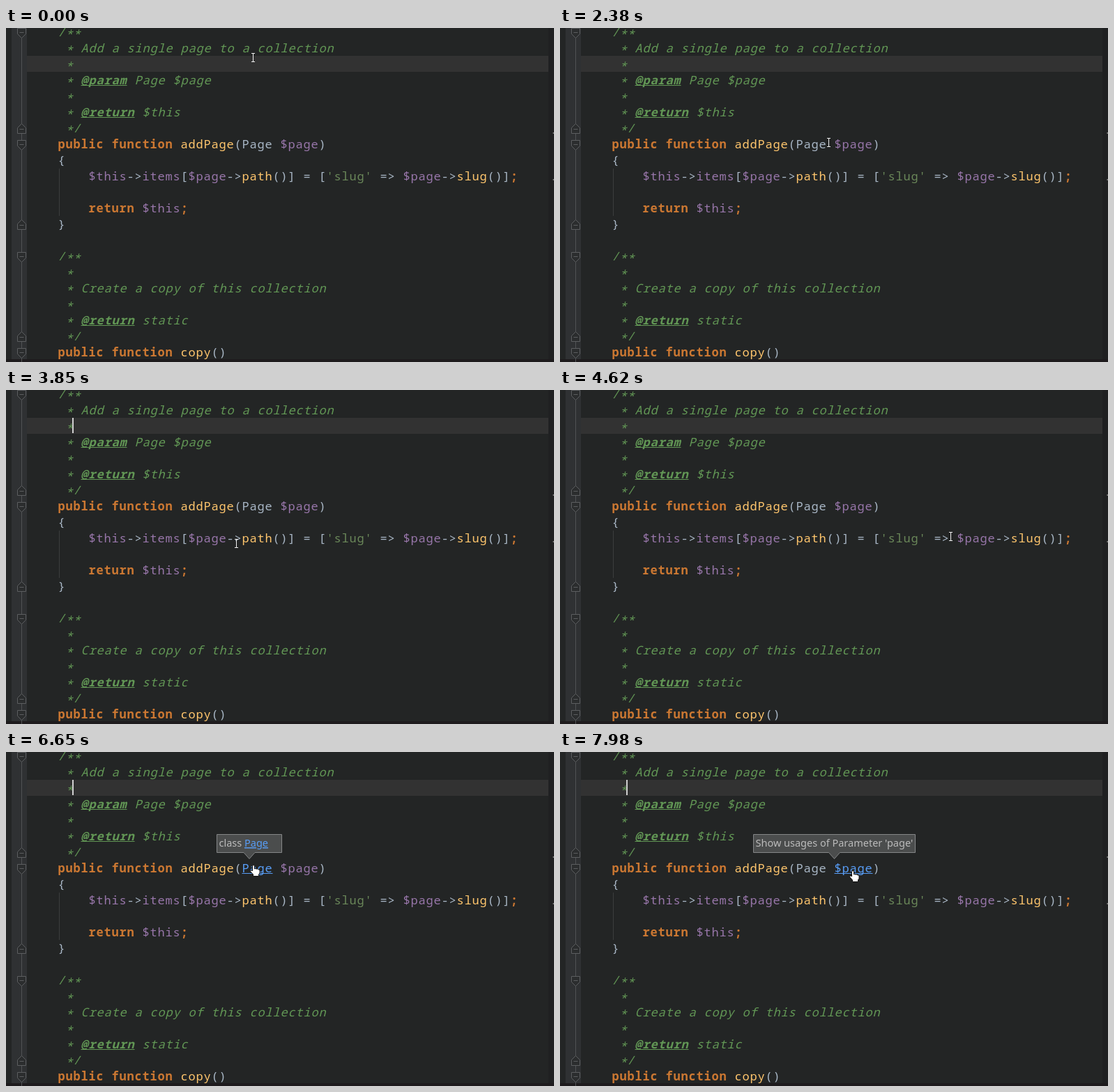
Write an HTML page that moves like this. It is 786x480 px and loops after 8 s.

```html
<!DOCTYPE html>
<html lang="en">
<head>
<meta charset="utf-8">
<title>Code editor</title>
<style>
html, body { margin: 0; width: 100%; height: 100%; overflow: hidden; background: #232525; }
pre, svg { position: absolute; left: 0; top: 0; margin: 0; }
pre {
  left: 30.5px; top: -6px; color: #a9b7c6;
  font: 17px/23px "Noto Sans Mono", "DejaVu Sans Mono", monospace;
  letter-spacing: .8px; font-variant-ligatures: none;
}
pre b { color: #cc7832; }
pre i { color: #629755; }
pre u { font-weight: bold; }
pre u, .link { text-decoration: underline 1px; text-underline-offset: 1px; text-decoration-skip-ink: none; }
pre em { color: #ffc66d; font-style: normal; }
pre var { color: #9876aa; font-style: normal; }
pre q { color: #6a8759; quotes: none; }
pre sub { position: relative; top: 3px; font-size: inherit; vertical-align: baseline; line-height: 0; }
pre .link, pre .link var { color: #589df6; }
.tip { font: 14.5px "Noto Sans", "Open Sans", sans-serif; fill: #bbb; }
.tip path { fill: #4b4d4d; stroke: #858788; stroke-linejoin: round; }
.tip .link { fill: #589df6; }
.fold { fill: #2b2d2e; stroke: #5c5e60; }
</style>
</head>
<body>
<svg id="back" width="786" height="480">
  <rect x="8" width="22" height="480" fill="#2f3133"/>
  <rect x="778" width="8" height="480" fill="#1f2021"/>
  <rect x="30" y="40" width="748" height="23" fill="#323232"/>
  <rect y="476" width="786" height="4" fill="#1e1b1d"/>
  <path d="M784.5 151h2M784.5 218h2" stroke="#808080" stroke-width="2"/>
  <path d="M76.5 202V270" stroke="#3b3d3d"/>
  <path d="M22.5 0V480" stroke="#505254"/>
</svg>
<pre>
    <i>/**</i>
    <i> * Add a single page to a collection</i>
    <i> *</i>
    <i> * <u>@param</u> Page $page</i>
    <i> *</i>
    <i> * <u>@return</u> $this</i>
    <i> */</i>
    <b>public function</b> <em>addPage</em>(<span id="type">Page</span> <span id="param"><var>$page</var></span>)
    {
        <var>$this</var>-&gt;<var>items</var>[<var>$page</var>-&gt;<em>path</em>()] = [<q>'slug'</q> =&gt; <var>$page</var>-&gt;<em>slug</em>()]<b>;</b>

        <b>return</b> <var>$this</var><b>;</b>
    }

    <i>/**</i>
    <i> *</i>
    <i> * Create a copy of this collection</i>
    <i> *</i>
    <i> * <u>@return</u> static</i>
    <i> */</i>
    <b>public function</b> <em>copy</em>()
</pre>
<svg id="front" width="786" height="480">
  <rect id="caret" x="95" y="40" width="2" height="22" fill="#d0d0d0"/>
  <path id="beam" d="M-2 -5.5H3M.5 -5.5V6.5M-2 6.5H3" stroke="#f0f0f0"/>
  <path id="hand" fill="#fff" stroke="#111" d="M-1.5 .5Q0 -1.5 1.5 .5V5Q3 3.7 4 5.2Q5.5 4.2 6.5 5.8Q8.5 5 9 7.5V11L7.5 13V15.5H-.5V13L-4.5 8.5Q-4.5 6.5 -2.5 7L-1.5 8Z"/>
</svg>
<script>
const LOOP = 8000, STEP = 70, BLINK = 493.5, BLINK_START = 728, HOVER_START = 6440;
const ROW = 23, COL = 11, TEXT_LEFT = 30;
const $ = id => document.getElementById(id);

// where the pointer turns or rests: time, x, y
const stops = [
  [280, 354, 42], [1190, 270, 129], [2380, 385, 164], [2800, 394, 190], [3850, 330, 220],
  [4900, 644, 206], [5460, 535, 188], [6440, 354, 162], [7140, 357, 165], [7770, 420, 171]
];

function pointerAt(t) {
  const i = stops.findIndex(s => s[0] > t);
  const b = stops.at(i), a = i > 0 ? stops[i - 1] : b;
  const k = a === b ? 0 : (t - a[0]) / (b[0] - a[0]);
  return [1, 2].map(n => Math.round(a[n] + (b[n] - a[n]) * k));
}

// column ranges of the words that turn into links
const words = { type: [28, 32], param: [33, 38] };

const show = (id, on) => $(id).style.display = on ? '' : 'none';

function draw(now) {
  const t = Math.floor(now % LOOP / STEP) * STEP;
  const [x, y] = pointerAt(t);
  const col = (x - TEXT_LEFT) / COL;
  let linked = false;
  for (const [id, [from, to]] of Object.entries(words)) {
    const on = t >= HOVER_START && col >= from && col < to;
    $(id).classList.toggle('link', on);
    show(id + 'Tip', on);
    linked ||= on;
  }
  show('hand', linked);
  show('beam', !linked);
  $(linked ? 'hand' : 'beam').setAttribute('transform', `translate(${x} ${y})`);
  show('caret', t >= BLINK_START && Math.floor((t - BLINK_START) / BLINK) % 2 === 0);
  requestAnimationFrame(draw);
}

function addTip(id, center, width, label) {
  const half = width / 2;
  $('caret').insertAdjacentHTML('afterend', `<g id="${id}" class="tip" transform="translate(${center} 118.5)">
    <path d="M${-half} 0H${half}V26H8L0 35L-8 26H${-half}Z"/>
    <text x="${3 - half}" y="17.5">${label}</text></g>`);
}

addTip('typeTip', 349, 93, 'class <tspan class="link">Page</tspan>');
addTip('paramTip', 393.5, 232, "Show usages of Parameter 'page'");

// fold markers on the first and last row of each block
document.querySelector('pre').textContent.split('\n').forEach((line, i) => {
  const opens = /^ *(\/\*\*|public)/.test(line);
  if (!opens && !/^ *(\*\/|})/.test(line)) return;
  const y = ROW * i + (opens ? 7.5 : 6.5);
  $('back').insertAdjacentHTML('beforeend',
    `<path class="fold" transform="translate(22.5 ${y}) scale(1 ${opens ? 1 : -1})"
      d="M-6 -7H6V1L0 7L-6 1ZM-3 -1H3"/>`);
});

// asterisks sit at mid-height
for (const el of document.querySelectorAll('pre i'))
  el.innerHTML = el.innerHTML.replace(/\*/g, '<sub>*</sub>');

requestAnimationFrame(draw);
</script>
</body>
</html>
```
